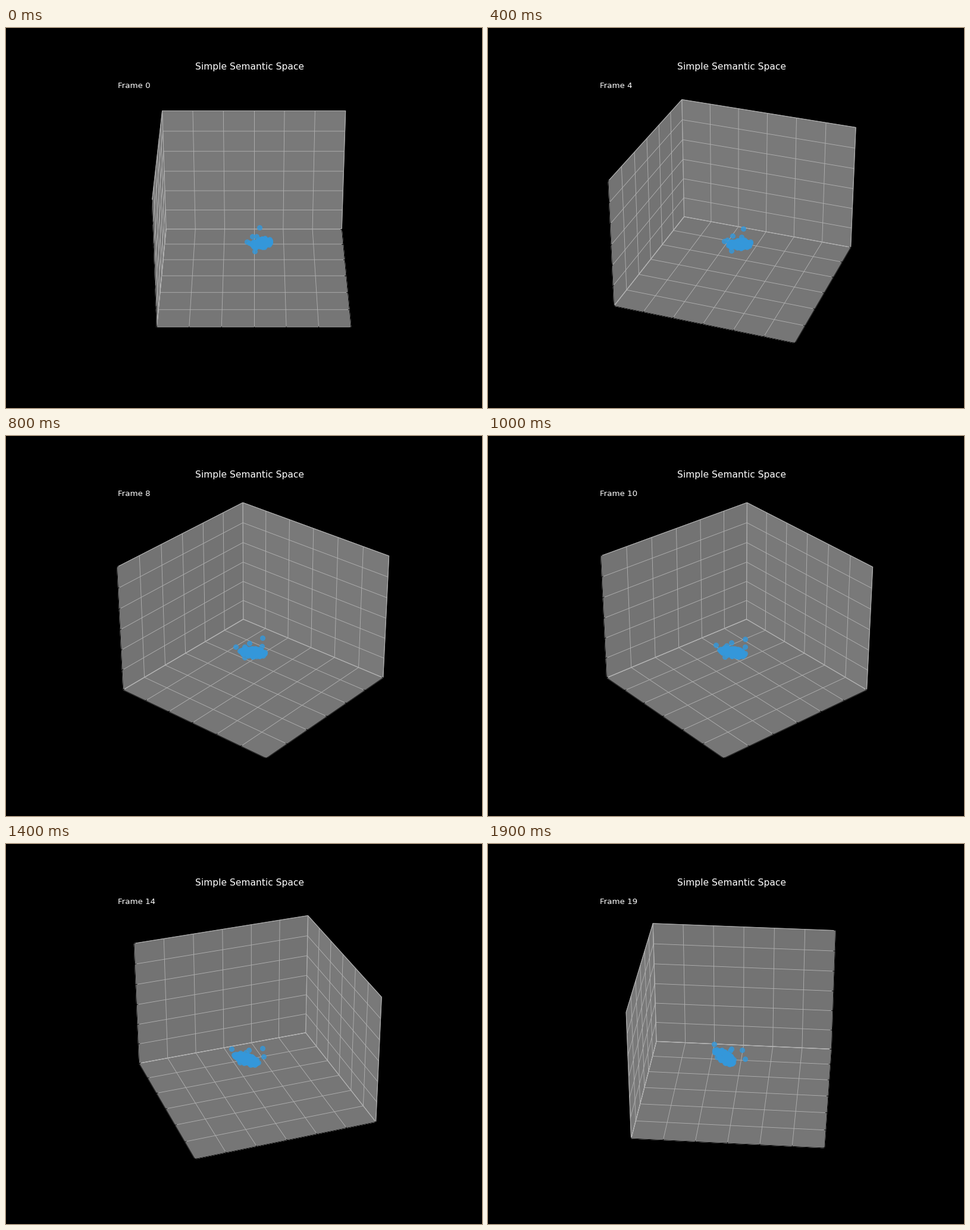
A matplotlib script for the animation above (2 s loop, 800 by 640 pixels).

```python
import numpy as np
import matplotlib.pyplot as plt
from matplotlib.animation import FuncAnimation

FRAMES = 20
STEP = 5  # degrees of azimuth per frame
BLUE = "#3498db"

# Points standing clear of the cluster
STRAYS = [(-0.22, 0.18, -0.74), (0.72, -0.14, -0.75), (0.2, -0.22, -1.11),
          (-0.31, 0.08, -1.25), (0.15, -0.06, -0.89), (0.49, 0.02, -1.36)]


def cluster(count):
    """Seeded points filling an ellipsoid that lies across the x-y diagonal."""
    rng = np.random.default_rng(7)
    ball = rng.normal(size=(count, 3))
    ball /= np.linalg.norm(ball, axis=1, keepdims=True)
    ball *= rng.random((count, 1)) ** 0.25
    u, v, w = ball.T * np.array([[0.43], [0.2], [0.16]])
    turn = np.radians(-42)
    x = 0.36 + u * np.cos(turn) - v * np.sin(turn)
    y = 0.23 + u * np.sin(turn) + v * np.cos(turn)
    return np.column_stack([x, y, -1.07 + 0.2 * u + w])


fig = plt.figure(figsize=(10, 8), dpi=80, facecolor="black")
ax = fig.add_subplot(projection="3d", facecolor="black")
ax.set(xlim=(-3, 3), ylim=(-3, 3), zlim=(-3, 3))
for axis in (ax.xaxis, ax.yaxis, ax.zaxis):
    axis.set_ticks(range(-3, 4), labels=[""] * 7)
ax.set_title("Simple Semantic Space", color="white", fontsize=14)

points = np.vstack([STRAYS, cluster(110)])
ax.scatter(*points.T, s=50, color=BLUE, alpha=0.8, depthshade=False)
label = ax.text2D(0.05, 0.95, "", transform=ax.transAxes,
                  color="white", fontsize=12)


def draw(i):
    ax.view_init(elev=30, azim=STEP * i)
    label.set_text(f"Frame {i}")
    return (label,)


anim = FuncAnimation(fig, draw, frames=FRAMES, interval=100,
                     repeat=True, repeat_delay=0, blit=False)
plt.show()
```
